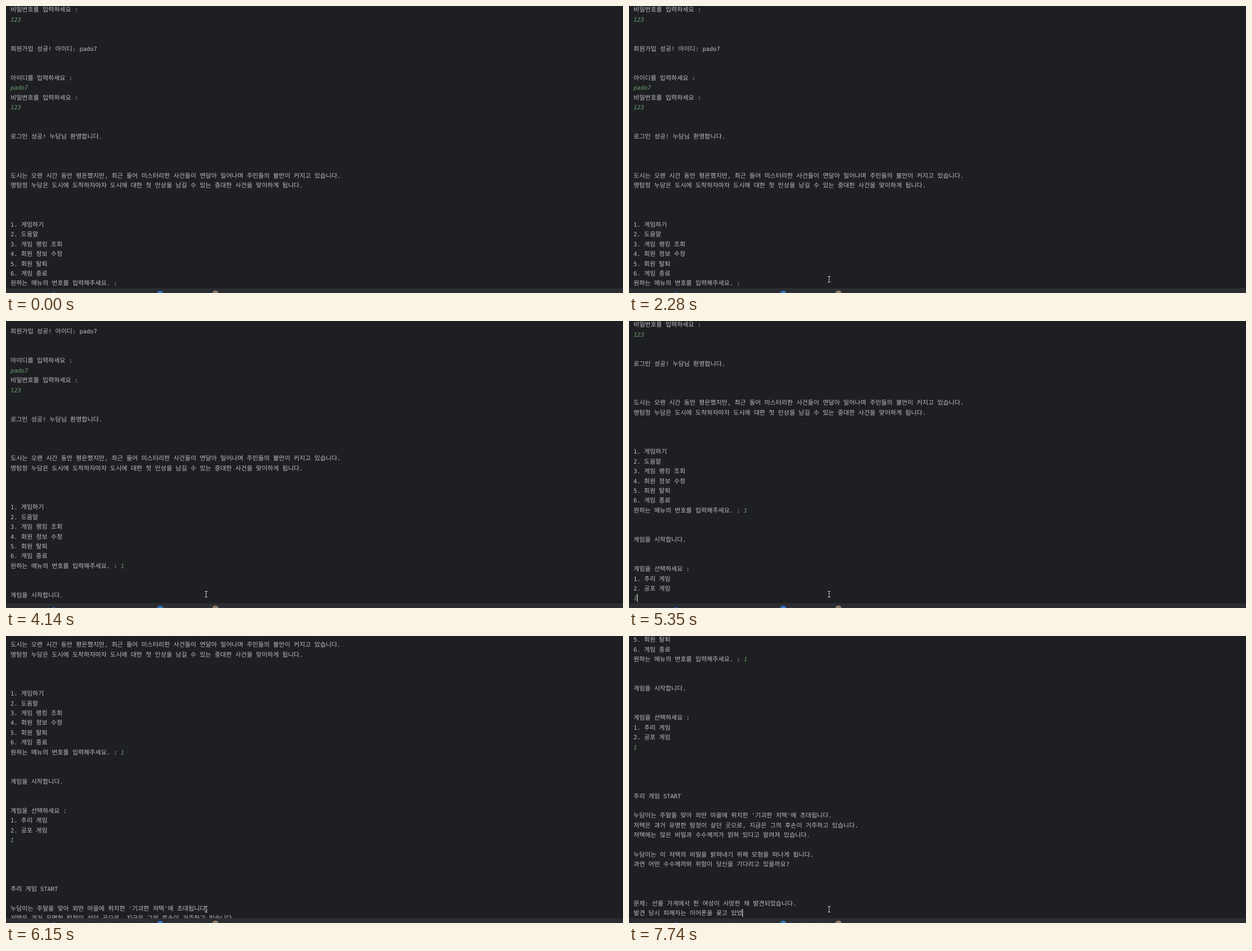
An HTML page with a canvas for the animation above (8 s loop, 1096 px wide and 511 px high).

```html
<!DOCTYPE html>
<html lang="ko">
<head>
<meta charset="utf-8">
<title>Console game</title>
<style>
  html, body { margin: 0; width: 100%; height: 100%; overflow: hidden; background: #1e1f22; }
  canvas { display: block; width: 100%; height: 100%; }
</style>
</head>
<body>
<canvas id="stage" width="1096" height="511"></canvas>
<script>
const ctx = document.getElementById('stage').getContext('2d');
const LOOP = 8000, ROW = 17.4, LEFT = 8, BASELINE = 10.2, EDITOR_BOTTOM = 502.5;
const KOREAN = '11.03px "Noto Sans CJK KR", "Noto Sans CJK", sans-serif';
const LATIN = '10.4px "DejaVu Sans Mono", monospace';

// Text after "~" is typed by the player.
const rows = `비밀번호를 입력하세요 :
~123


회원가입 성공! 아이디: pado7


아이디를 입력하세요 :
~pado7
비밀번호를 입력하세요 :
~123


로그인 성공! 누담님 환영합니다.



도시는 오랜 시간 동안 평온했지만, 최근 들어 미스터리한 사건들이 연달아 일어나며 주민들의 불안이 커지고 있습니다.
명탐정 누담은 도시에 도착하자마자 도시에 대한 첫 인상을 남길 수 있는 중대한 사건을 맞이하게 됩니다.



1. 게임하기
2. 도움말
3. 게임 랭킹 조회
4. 회원 정보 수정
5. 회원 탈퇴
6. 게임 종료
원하는 메뉴의 번호를 입력해주세요. : ~1


게임을 시작합니다.


게임을 선택하세요 :
1. 추리 게임
2. 공포 게임
~1




추리 게임 START

누담이는 주말을 맞아 외딴 마을에 위치한 '기괴한 저택'에 초대됩니다.
저택은 과거 유명한 탐정이 살던 곳으로, 지금은 그의 후손이 거주하고 있습니다.
저택에는 많은 비밀과 수수께끼가 얽혀 있다고 알려져 있습니다.

누담이는 이 저택의 비밀을 밝혀내기 위해 모험을 떠나게 됩니다.
과연 어떤 수수께끼와 위험이 당신을 기다리고 있을까요?



문제: 선물 가게에서 한 여성이 사망한 채 발견되었습니다.
발견 당시 피해자는 이어폰을 꽂고 있었`.split('\n');

// time, first visible row, last row, characters shown of the last row, caret
const consoleSteps = [
  [0, 0, 28, 22, false],
  [1360, 0, 28, 22, true],
  [2280, 0, 28, 22, false],
  [2820, 0, 28, 22, true],
  [3150, 0, 28, 24, true],
  [3540, 1, 29, 0, true],
  [4140, 3.31, 37, 0, false],
  [4210, 9, 37, 0, true],
  [4760, 9, 37, 0, false],
  [5290, 9, 37, 0, true],
  [5350, 9, 37, 2, true],
  [5620, 10, 38, 0, true],
  [6150, 16.48, 53, 0, false],
  [6220, 25, 53, 7, true],
  [6410, 25, 53, 16, true],
  [6740, 25, 53, 25, true],
  [6940, 25, 53, 31, true],
  [7210, 26, 54, 7, true],
  [7540, 26, 54, 16, true],
  [7740, 26, 54, 21, true]
];

// time, x, y of the mouse pointer
const pointerSteps = [
  [0, -50, 0],
  [70, 660, 500], [135, 592, 499], [200, 552, 496],
  [400, 540, 498], [467, 500, 497], [534, 450, 493], [601, 405, 488],
  [668, 372, 484], [735, 356, 483], [802, 357, 486], [870, 360, 488],
  [1220, 358, 487], [1290, 356, 487], [1360, 355, 486]
];

const stepAt = (steps, time) => steps.findLast(step => step[0] <= time);

function drawRow(text, y) {
  let x = LEFT;
  text.split('~').forEach((part, typed) => {
    ctx.fillStyle = typed ? '#6a9f71' : '#bcbec4';
    for (const run of part.match(/[가-힣]+|[^가-힣]+/g) || []) {
      ctx.font = (typed ? 'italic ' : '') + (/[가-힣]/.test(run) ? KOREAN : LATIN);
      ctx.fillText(run, x, y);
      x += ctx.measureText(run).width;
    }
  });
  return x;
}

function drawConsole(time) {
  const [, top, last, shown, caret] = stepAt(consoleSteps, time);
  ctx.fillStyle = '#1e1f22';
  ctx.fillRect(0, 0, 1096, 511);
  for (let i = Math.floor(top); i <= last; i++) {
    const y = BASELINE + (i - top) * ROW;
    const end = drawRow(i === last ? rows[i].slice(0, shown) : rows[i], y);
    if (i === last && caret) {
      ctx.fillStyle = '#ced0d6';
      ctx.fillRect(Math.floor(end), Math.round(y - 11), 1.3, 14);
    }
  }
}

function dot(x, y, radius, color) {
  ctx.fillStyle = color;
  ctx.beginPath();
  ctx.arc(x, y, radius, 0, Math.PI * 2);
  ctx.fill();
}

function drawStatusBar() {
  ctx.fillStyle = '#2b2d30';
  ctx.fillRect(0, EDITOR_BOTTOM, 1096, 9);
  ctx.font = '10px Inter, sans-serif';
  ctx.fillStyle = '#8c8f96';
  ctx.fillText('mystery_prj', LEFT, 518);
  ctx.fillText('src  ›  game  ›  service  ›  controller', 94, 518);
  ctx.fillText('GameService', 284, 518);
  ctx.fillStyle = '#3574f0';
  ctx.fillRect(82, 510, 5, 1);
  dot(274, 513, 6, '#3574c8');
  dot(372, 512, 5.5, '#8f7d6c');
}

function drawPointer(time) {
  const [, x, y] = stepAt(pointerSteps, time);
  ctx.strokeStyle = '#c9cacc';
  ctx.lineWidth = 1;
  ctx.beginPath();
  ctx.moveTo(x + .5, y - 4.5);
  ctx.lineTo(x + .5, y + 5.5);
  for (const edge of [-4.5, 5.5]) {
    ctx.moveTo(x - 2, y + edge);
    ctx.lineTo(x + 3, y + edge);
  }
  ctx.stroke();
}

function frame(now) {
  const time = now % LOOP;
  ctx.textRendering = 'geometricPrecision';
  drawConsole(time);
  drawStatusBar();
  drawPointer(time);
  requestAnimationFrame(frame);
}
requestAnimationFrame(frame);
</script>
</body>
</html>
```
